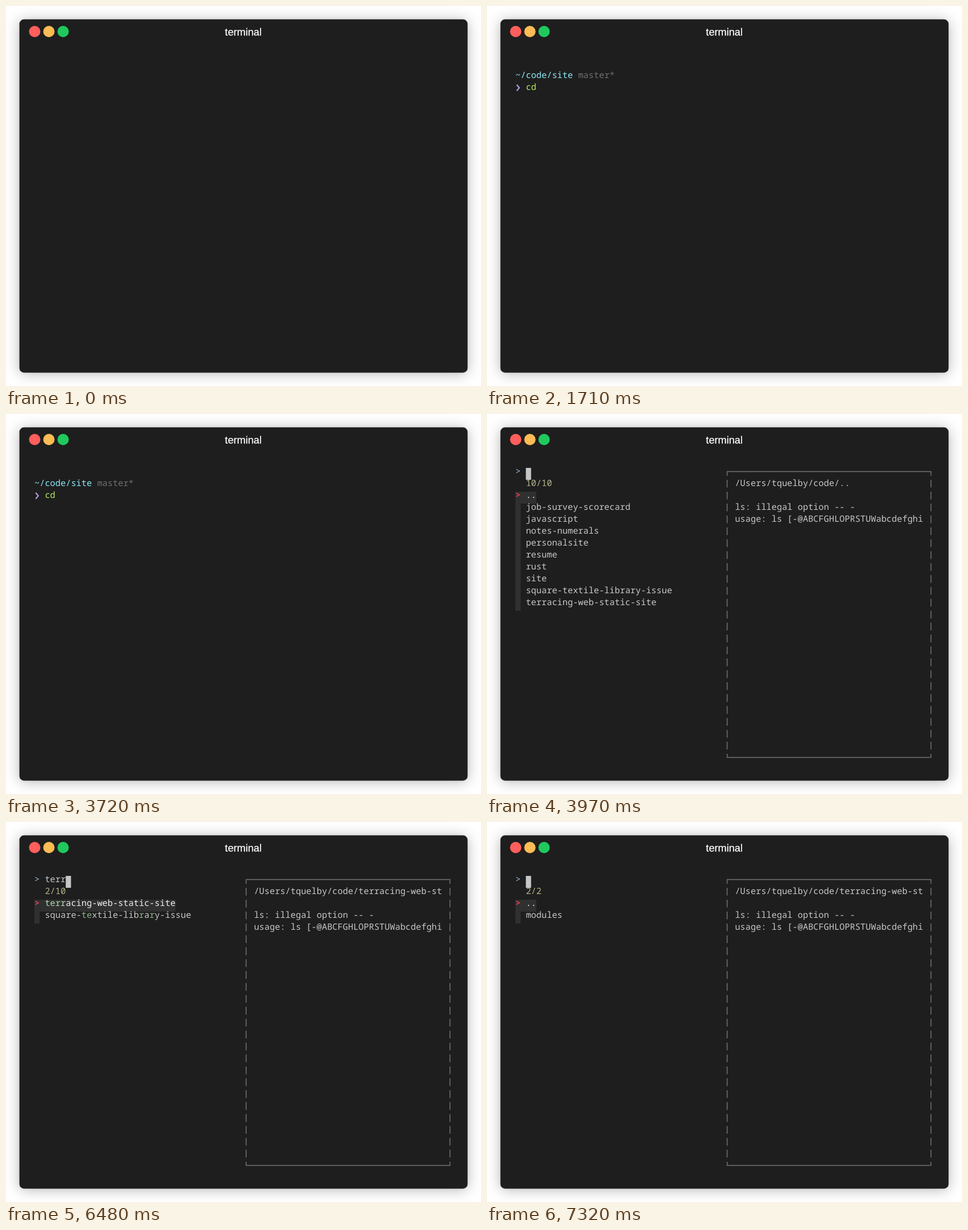
Write an HTML page that moves like this. It is 836 px wide and 670 px high and loops after 8000 ms.

```html
<!DOCTYPE html>
<html lang="en">
<head>
<meta charset="utf-8">
<title>terminal</title>
<style>
  html, body { margin: 0; width: 100%; height: 100%; overflow: hidden; background: #fff; }
  .shadow {
    position: absolute; left: 24px; top: 24px; width: 788px; height: 622px;
    border-radius: 8px; box-shadow: 0 2px 24px rgba(0, 0, 0, .3);
  }
  svg { position: absolute; left: 0; top: 0; width: 836px; height: 670px; }
  text {
    font: 15.333px "Noto Sans Mono", "DejaVu Sans Mono", monospace;
    fill: #c7c7c7; white-space: pre; text-rendering: geometricPrecision;
  }
  .title {
    font: 18.2px "Liberation Sans", Arial, sans-serif; text-anchor: middle;
    fill: #fff; stroke: #fff; stroke-width: .25;
  }
  .path { fill: #8fe9f7; }
  .dim { fill: #6f6f6f; }
  .valid { fill: #b9e95f; }
  .unknown { fill: #ff5c57; }
  .query { fill: #9dbfe2; font-weight: 500; }
  .count { fill: #b5b58c; }
  .pointer { fill: #e23f58; font-weight: 600; }
  .current { fill: #f0f0f0; font-weight: 500; }
  .match { fill: #8ab58a; }
  .current .match { fill: #afd7af; }
  .bar { fill: #303030; }
  .cursor { fill: #c7c7c7; }
  .arrow { fill: none; stroke: #b59ae0; stroke-width: 2.2; }
  .border { fill: none; stroke: #727272; stroke-width: 1.5; }
  .scene { visibility: hidden; }
  .scene.on { visibility: visible; }
</style>
</head>
<body>
<div class="shadow"></div>
<svg viewBox="0 0 836 670">
  <rect x="23.6" y="23.6" width="788.8" height="622.8" rx="8" fill="#1e1e1e"/>
  <circle cx="50.5" cy="45" r="10" fill="#fe5f5c"/>
  <circle cx="75.5" cy="45" r="10" fill="#ffbc55"/>
  <circle cx="100.5" cy="45" r="10" fill="#1fc95d"/>
  <text class="title" x="417.7" y="52">terminal</text>
  <g id="screen"></g>
</svg>
<script>
const LOOP = 8000, CELL = 9.2, ROW = 21, BASELINE = 11.3;
const colX = col => 50 + col * CELL;
const rowY = row => 95 + row * ROW;

const text = (col, row, content, cls = '') =>
  `<text x="${colX(col)}" y="${rowY(row) + BASELINE}" class="${cls}">${content}</text>`;
const block = (col, row, cols, rows, cls) =>
  `<rect x="${colX(col)}" y="${rowY(row)}" width="${cols * CELL}" height="${rows * ROW}" class="${cls}"/>`;

function prompt(branch = '', command = '', hint = '', cls = 'valid') {
  return text(0, 1, '~/code/site', 'path') + text(12, 1, branch, 'dim') +
    '<path class="arrow" d="M52.3 138.8L56.8 144.2L52.3 149.6"/>' +
    text(2, 2, command, cls) + text(2 + command.length, 2, hint, 'dim');
}

// Indices of the query letters, taken in order; null when one is missing.
function findMatch(name, query) {
  const hits = [];
  for (const letter of query) {
    const at = name.indexOf(letter, hits.length ? hits[hits.length - 1] + 1 : 0);
    if (at < 0) return null;
    hits.push(at);
  }
  return hits;
}

function search(names, query) {
  const found = names.map(name => ({ name, hits: findMatch(name, query) })).filter(item => item.hits);
  if (!query) return found;
  const inner = ({ name, hits }) => hits[0] > 0 && name[hits[0] - 1] !== '-' ? 1 : 0;
  return found.sort((a, b) => inner(a) - inner(b) || a.name.length - b.name.length);
}

const highlight = ({ name, hits }) => [...name].map((letter, i) =>
  hits.includes(i) ? `<tspan class="match">${letter}</tspan>` : letter).join('');

function frame() {
  const left = colX(40.5), right = colX(79.5), top = 101.5, bottom = 605.5;
  let path = `M${left} 109V${top}H${right}V109M${left} 599V${bottom}H${right}V599`;
  for (let row = 1; row < 24; row++)
    for (const x of [left, right]) path += `M${x} ${rowY(row)}v13.5`;
  return `<path class="border" d="${path}"/>`;
}

function finder(names, query, folder) {
  const items = search(names, query);
  let out = frame() + block(0, 2, 1, items.length, 'bar') +
    block(0, 2, 2 + items[0].name.length, 1, 'bar') +
    text(0, 0, '&gt;', 'query') + text(2, 0, query) +
    block(2 + query.length, 0, 1, 1, 'cursor') +
    text(2, 1, `${items.length}/${names.length}`, 'count') + text(0, 2, '&gt;', 'pointer');
  items.forEach((item, i) => out += text(2, 2 + i, highlight(item), i ? '' : 'current'));
  if (folder) {
    out += text(42, 1, `/Users/tquelby/code/${folder}`.slice(0, 36)) +
      text(42, 3, 'ls: illegal option -- -') +
      text(42, 4, 'usage: ls [-@ABCFGHLOPRSTUWabcdefghi');
  }
  return out;
}

const project = 'terracing-web-static-site';
const siteDir = ['..', 'dist', 'filters', 'grid-unfold', 'images', 'node_modules',
  'resources', 'site', 'talks', 'terracing'];
const codeDir = ['..', 'job-survey-scorecard', 'javascript', 'notes-numerals', 'personalsite',
  'resume', 'rust', 'site', 'square-textile-library-issue', project];
const projectDir = ['..', 'modules'];

const scenes = [
  [0, ''],
  [150, prompt()],
  [200, prompt('master')],
  [250, prompt('master*')],
  [690, prompt('master*', 'c', 'd ' + project, 'unknown')],
  [880, prompt('master*', 'cd', ' ' + project)],
  [1710, prompt('master*', 'cd')],
  [1980, finder(siteDir, '')],
  [2000, finder(siteDir, '', 'site/..')],
  [3720, prompt('master*', 'cd')],
  [3770, finder(codeDir, '')],
  [3970, finder(codeDir, '', '..')],
  [5930, finder(codeDir, 't', '..')],
  [5950, finder(codeDir, 't', project)],
  [6070, finder(codeDir, 'te', project)],
  [6210, finder(codeDir, 'ter', project)],
  [6480, finder(codeDir, 'terr', project)],
  [7070, prompt('master*', 'cd')],
  [7120, finder(projectDir, '')],
  [7320, finder(projectDir, '', project)]
];

const screen = document.getElementById('screen');
screen.innerHTML = scenes.map(([, markup]) => `<g class="scene">${markup}</g>`).join('');
const groups = [...screen.children];

function draw() {
  const time = performance.now() % LOOP;
  const active = scenes.filter(([start]) => start <= time).length - 1;
  groups.forEach((group, i) => group.classList.toggle('on', i === active));
  requestAnimationFrame(draw);
}
draw();
</script>
</body>
</html>
```
